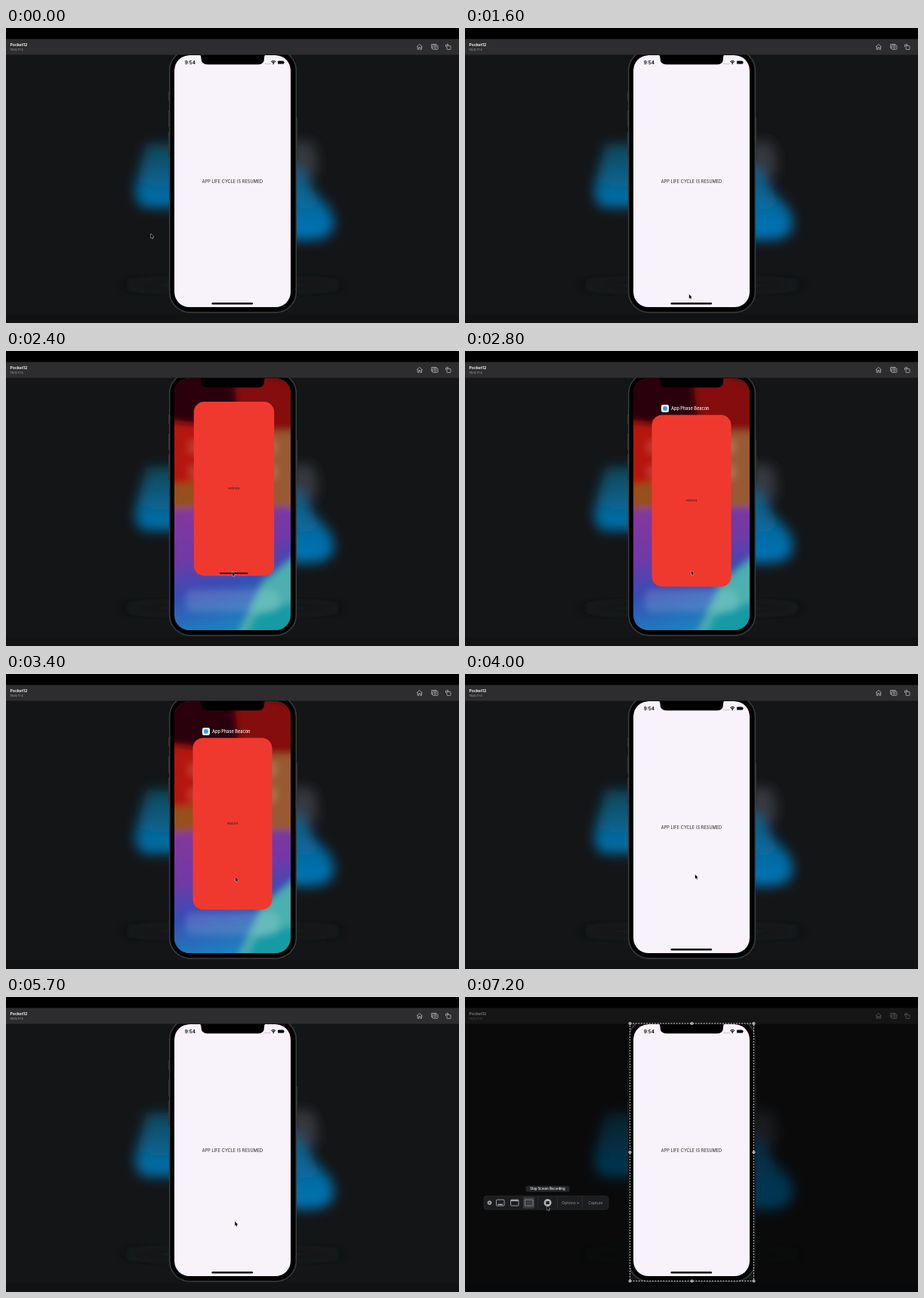
These frames come from a looping animation (600x390 px, 7.5 s). An HTML page:

```html
<!DOCTYPE html>
<html lang="en">
<head>
<meta charset="utf-8">
<title>App life cycle demo</title>
<style>
  html, body { margin: 0; width: 100%; height: 100%; overflow: hidden; background: #000; }
  svg { display: block; width: 100vw; height: 100vh; font-family: Inter, Roboto, sans-serif; }
  .line { fill: none; stroke: #b8b8ba; stroke-width: .8; }
  .mid { text-anchor: middle; }
</style>
</head>
<body>
<svg viewBox="0 0 600 390">
  <defs>
    <filter id="soft" x="-50%" y="-50%" width="200%" height="200%"><feGaussianBlur stdDeviation="8"/></filter>
    <filter id="haze" x="-50%" y="-50%" width="200%" height="200%"><feGaussianBlur stdDeviation="5"/></filter>
    <linearGradient id="leftGlow" x1="0" y1="0" x2="0" y2="1">
      <stop offset="0" stop-color="#0b4656"/><stop offset="1" stop-color="#0474b2"/>
    </linearGradient>
    <linearGradient id="rightGlow" x1="0" y1="0" x2="0" y2="1">
      <stop offset="0" stop-color="#0a5878"/><stop offset="1" stop-color="#0476ba"/>
    </linearGradient>
    <linearGradient id="lower" x1="0" y1="0" x2=".25" y2="1">
      <stop offset="0" stop-color="#87369b"/><stop offset=".4" stop-color="#7139a6"/>
      <stop offset=".62" stop-color="#3a4bb4"/><stop offset="1" stop-color="#168cc0"/>
    </linearGradient>
    <clipPath id="screen"><rect x="223" y="36" width="154" height="333" rx="20"/></clipPath>
    <clipPath id="desk"><rect y="35" width="600" height="355"/></clipPath>
  </defs>

  <!-- Desktop -->
  <rect width="600" height="390"/>
  <g clip-path="url(#desk)">
    <rect y="35" width="600" height="343" fill="#141517"/>
    <rect y="378" width="600" height="12" fill="#111214"/>
    <ellipse cx="300" cy="340" rx="150" ry="7" fill="#191a1c" filter="url(#soft)"/>
    <g filter="url(#soft)">
      <path d="M186 153H235V237H184Q168 230 172 206Z" fill="url(#leftGlow)"/>
      <path d="M376 150H404Q416 165 411 195L376 205Z" fill="#36393c"/>
      <path d="M370 176L393 188 412 222Q437 240 434 264Q427 280 403 280H370Z" fill="url(#rightGlow)"/>
    </g>

    <!-- Phone body -->
    <path d="M215.5 84V96M215.5 109V131M215.5 137V171M385.5 118V170" stroke="#303333"/>
    <rect x="216.7" y="29" width="167.6" height="347" rx="27" stroke="#3b3e3e" stroke-width="1.5"/>
  </g>

  <g clip-path="url(#screen)">
    <!-- Wallpaper -->
    <rect x="223" y="36" width="154" height="333" fill="#7d2c20"/>
    <g filter="url(#haze)">
      <path d="M205 20H395V100L300 110 205 90Z" fill="#2b0511"/>
      <path d="M300 20L395 45V112L310 100Z" fill="#850a0c"/>
      <path d="M205 92L300 104V180H205Z" fill="#b5160c"/>
      <path d="M320 106H395V212H320Z" fill="#985a30"/>
      <path d="M205 178L300 168V220H205Z" fill="#97501a"/>
      <path d="M205 211L300 204 395 208V390H205Z" fill="url(#lower)"/>
      <path d="M395 262L340 306 300 390H395Z" fill="#4cb0ae"/>
      <path d="M395 325L330 350 310 390H395Z" fill="#199ba5"/>
    </g>
    <g filter="url(#haze)" fill="#fff" opacity=".14">
      <rect x="238" y="315" width="124" height="30" rx="9"/>
      <rect x="240" y="117" width="20" height="20" rx="5"/>
      <rect x="240" y="150" width="20" height="20" rx="5"/>
      <rect x="340" y="117" width="20" height="20" rx="5"/>
      <rect x="340" y="150" width="20" height="20" rx="5"/>
    </g>

    <!-- Running app -->
    <g id="card">
      <rect id="page" x="223" y="36" width="154" height="333" rx="20"/>
      <text id="state" class="mid" x="300" y="204.5" font-size="5.5" letter-spacing=".1" fill="#1d1b20"></text>
      <rect id="homeBar" x="272.5" y="363" width="54.5" height="2.4" rx="1.2"/>
    </g>
    <g id="label">
      <rect x="260" y="71" width="10" height="10" rx="2.3" fill="#f5f8fb"/>
      <circle cx="265" cy="76" r="3" fill="#3b9fe0"/>
      <text x="273" y="78" font-size="5.6" font-weight="500" fill="#fff">App Phase Beacon</text>
    </g>
    <g id="status">
      <text x="236.8" y="48" font-size="6.3" font-weight="600">9:54</text>
      <path d="M343 47.4H350" stroke="#999" stroke-dasharray="1 1"/>
      <path d="M351.3 44.6Q354.2 41.9 357.1 44.6M352.5 45.9Q354.2 44.3 355.9 45.9" fill="none" stroke="#000" stroke-width="1.1"/>
      <circle cx="354.2" cy="47.1" r=".9"/>
      <rect x="360" y="43.4" width="8" height="4.2" rx="1.2"/>
      <rect x="368.4" y="44.8" width=".7" height="1.5"/>
    </g>
    <path d="M256 35H344Q342 36 342 40Q342 48.3 334 48.3H267Q258.5 48.3 258.5 40Q258.5 36 256 35Z"/>
  </g>

  <!-- Simulator toolbar -->
  <rect y="14.5" width="600" height="21" fill="#2d2d2f"/>
  <text x="5.4" y="24.2" font-size="5.2" font-weight="700" fill="#f0f0f0">Pocket12</text>
  <text x="5.4" y="29.8" font-size="3.9" fill="#a5a5a7">mUQ 17.4</text>
  <g class="line">
    <path d="M544 25L547.8 21.5 551.6 25M545.2 24.3V28.3H546.9V25.6H548.8V28.3H550.5V24.3"/>
    <path d="M565 26.5H563.7V21.5H570V22.5"/>
    <rect x="565" y="23" width="7" height="5.3" rx=".8"/>
    <circle cx="568.5" cy="25.6" r="1.4"/>
    <rect x="584" y="23.6" width="5" height="4.8" rx=".6"/>
    <path d="M582.5 25V22.2H585.8M584.5 20.8L586 22.2 584.5 23.5"/>
  </g>

  <!-- Screen capture overlay -->
  <g id="capture">
    <path d="M0 0H600V390H0ZM218.5 35V375.5H382.5V35Z" fill-rule="evenodd" opacity=".52"/>
    <rect x="218.5" y="35" width="164" height="340.5" fill="none" stroke="#e4e4e4" stroke-width=".9" stroke-dasharray="2 1.6"/>
    <g id="handles" fill="#8d8d8d" stroke="#f2f2f2" stroke-width=".7"></g>
    <rect x="25" y="263" width="165" height="18" rx="4" fill="#1b1d1f" stroke="#2b2d2f" stroke-width=".7"/>
    <circle cx="32.5" cy="272" r="2.8" fill="#a5a5a6"/>
    <path d="M31.4 270.9L33.6 273.1M33.6 270.9L31.4 273.1" stroke="#1b1d1f" stroke-width=".7"/>
    <rect x="77" y="264.5" width="15" height="15" rx="2" fill="#3a3c3e"/>
    <g class="line">
      <rect x="41.5" y="268" width="10.5" height="8" rx="1"/><path d="M43.5 274.3H50" stroke-width="1.3"/>
      <rect x="60.5" y="268" width="10.5" height="8" rx="1"/><path d="M61 269.2H70.5" stroke-width="1.5"/>
      <rect x="79.5" y="268" width="10.5" height="8" rx=".6" stroke-dasharray="1.6 .8"/>
    </g>
    <path d="M96.5 264V280M122.5 264V280M155.5 264V280" stroke="#303234" stroke-width=".7"/>
    <circle cx="109.5" cy="272" r="5" fill="#b2b2b3"/>
    <rect x="107.4" y="269.9" width="4.2" height="4.2" rx=".5" fill="#1b1d1f"/>
    <g font-size="5.1" fill="#929395">
      <text x="128" y="273.9">Options</text>
      <text x="163.3" y="273.9">Capture</text>
    </g>
    <path class="line" d="M148.3 271.7L149.7 273 151.1 271.7" stroke-width=".6"/>
    <g id="tooltip">
      <rect x="81" y="250" width="57" height="7.2" rx="1.5" fill="#242527" stroke="#36383a" stroke-width=".4"/>
      <text class="mid" x="109.4" y="255.1" font-size="4.2" font-weight="600" fill="#e6e6e6">Stop Screen Recording</text>
    </g>
  </g>

  <path id="cursor" d="M0 0V5.7L1.3 4.6 2.2 6.6 3.1 6.2 2.2 4.2H3.9Z" stroke="#fff" stroke-width=".7" paint-order="stroke"/>
</svg>

<script>
const LOOP = 7500, STEP = 100;
const $ = id => document.getElementById(id);

// Each key is [time, ...values]; values ease from one key to the next.
const cursorKeys = [
  [0, 191.8, 272], [800, 246, 311], [1000, 246, 311], [1600, 296.8, 352],
  [1700, 298.5, 364], [1800, 299, 358], [2000, 299.7, 293], [2800, 299.7, 290.5],
  [3100, 300, 288], [3500, 304.8, 265], [4200, 304.8, 265], [5200, 304, 288],
  [5500, 304, 288], [5700, 303.3, 296.8], [6000, 303.3, 296.8],
  [6500, 190, 286], [6700, 190, 286], [7100, 108.5, 276]
];
const cardKeys = [
  [1700, 300, 202.5, 1], [2000, 302, 183, .702], [2500, 302, 182, .69],
  [2800, 300, 198, .682], [3500, 300, 198, .682], [3900, 300, 202.5, 1]
];
const labelKeys = [[2500, 0], [2800, 1], [3500, 1], [3700, 0]];

function sample(keys, t) {
  const next = keys.findIndex(key => key[0] > t);
  if (next === 0) return keys[0].slice(1);
  if (next < 0) return keys.at(-1).slice(1);
  const a = keys[next - 1], b = keys[next];
  const p = (t - a[0]) / (b[0] - a[0]), eased = p * p * (3 - 2 * p);
  return a.slice(1).map((v, i) => v + (b[i + 1] - v) * eased);
}

const show = (id, visible) => $(id).setAttribute('visibility', visible ? 'visible' : 'hidden');

for (const x of [218.5, 300.5, 382.5])
  for (const y of [35, 205.2, 375.5])
    if (x !== 300.5 || y !== 205.2)
      $('handles').innerHTML += `<circle cx="${x}" cy="${y}" r="1.6"/>`;

function draw(t) {
  const [x, y] = sample(cursorKeys, t);
  const [cx, cy, scale] = sample(cardKeys, t);
  const [labelAlpha] = sample(labelKeys, t);
  const hidden = t >= 1800 && t < 3800;

  $('cursor').setAttribute('transform', `translate(${x} ${y})`);
  $('card').setAttribute('transform', `translate(${cx} ${cy}) scale(${scale}) translate(-300 -202.5)`);
  $('page').setAttribute('fill', hidden ? '#f0392e' : '#f8f2fa');
  $('state').textContent = hidden ? 'HIDDEN' : 'APP LIFE CYCLE IS RESUMED';
  $('homeBar').setAttribute('opacity', 1 - labelAlpha);
  $('label').setAttribute('opacity', labelAlpha);
  show('status', !hidden);
  show('capture', t >= 6100);
  show('tooltip', t >= 7100);
}

function tick(now) {
  draw(Math.floor(now % LOOP / STEP) * STEP);
  requestAnimationFrame(tick);
}
draw(0);
requestAnimationFrame(tick);
</script>
</body>
</html>
```
